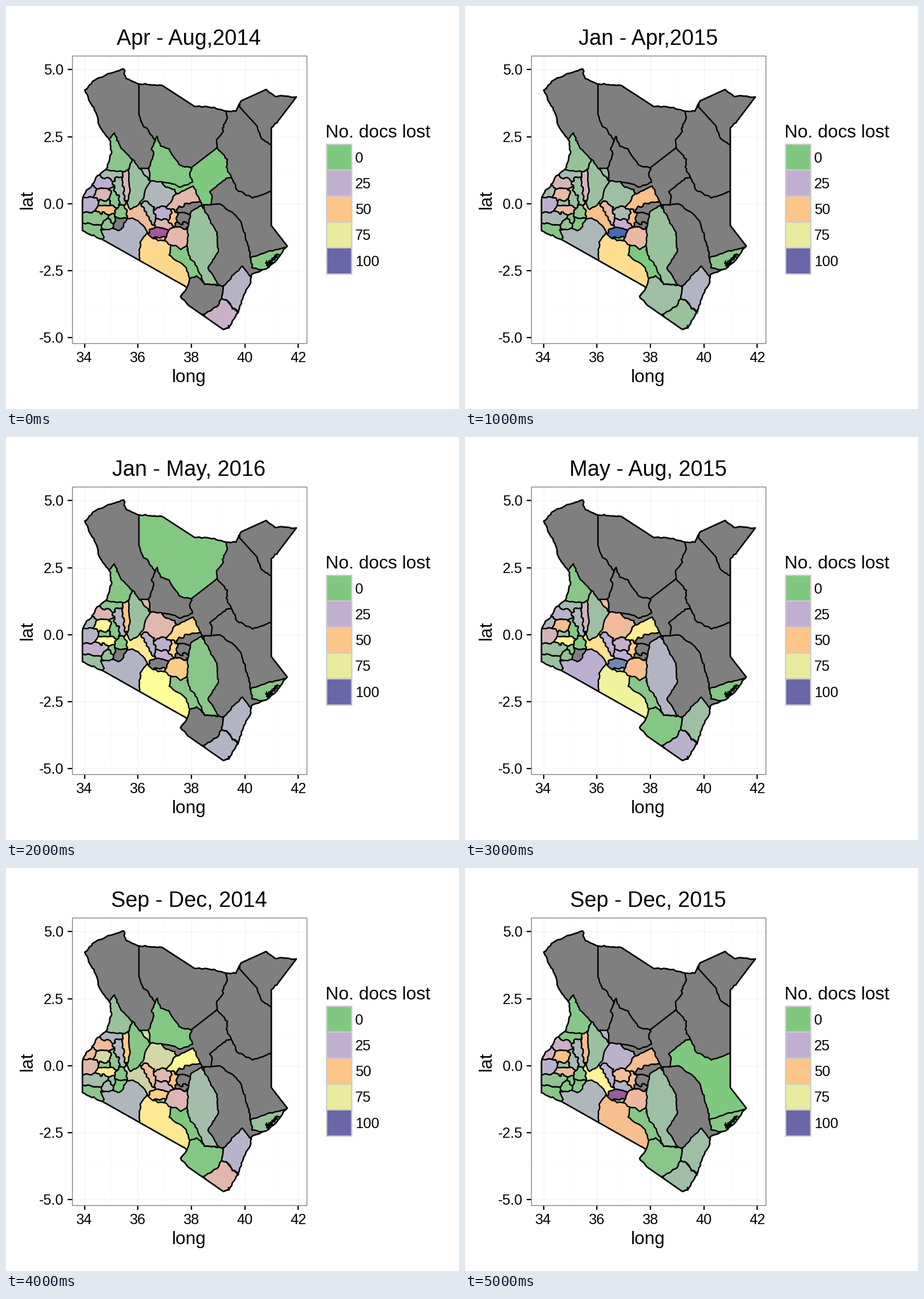
Recreate the animation shown at these times as a matplotlib script. Size 794 by 705 pixels, loop 6 s.

```python
import numpy as np
import matplotlib.pyplot as plt
from matplotlib.animation import FuncAnimation
from matplotlib.patches import PathPatch, Polygon, Rectangle

W, H, DPI = 794, 705, 100
PT = 72 / DPI
LINE = 2.5 * PT
plt.rcParams["font.family"] = "Liberation Sans"

TITLES = ["Apr - Aug,2014", "Jan - Apr,2015", "Jan - May, 2016",
          "May - Aug, 2015", "Sep - Dec, 2014", "Sep - Dec, 2015"]
STOPS = ["7FC97F", "BEAED4", "FDC086", "FFFF99", "386CB0", "F0027F"]
TOP = 120
N = None
NO_DATA = "#7f7f7f"

XYZ = np.array([[0.4124, 0.3576, 0.1805],
                [0.2126, 0.7152, 0.0722],
                [0.0193, 0.1192, 0.9505]])
WHITE = XYZ.sum(axis=1)


def to_lab(code):
    rgb = np.array([int(code[i:i + 2], 16) for i in (0, 2, 4)]) / 255
    lin = np.where(rgb > 0.04045, ((rgb + 0.055) / 1.055) ** 2.4, rgb / 12.92)
    t = XYZ @ lin / WHITE
    f = np.where(t > 0.008856, np.cbrt(t), 7.787 * t + 16 / 116)
    return np.array([116 * f[1] - 16, 500 * (f[0] - f[1]), 200 * (f[1] - f[2])])


def to_rgb(lab):
    fy = (lab[0] + 16) / 116
    f = np.array([fy + lab[1] / 500, fy, fy - lab[2] / 200])
    t = np.where(f > 0.2069, f ** 3, (f - 16 / 116) / 7.787)
    lin = np.clip(np.linalg.solve(XYZ, t * WHITE), 0, 1)
    return np.where(lin > 0.0031308, 1.055 * lin ** (1 / 2.4) - 0.055, 12.92 * lin)


LABS = np.array([to_lab(s) for s in STOPS])


def shade(value):
    if value is None:
        return NO_DATA
    at = np.linspace(0, TOP, len(LABS))
    lab = np.array([np.interp(value, at, LABS[:, k]) for k in range(3)])
    return tuple(np.clip(to_rgb(lab), 0, 1))


fig = plt.figure(figsize=(W / DPI, H / DPI), dpi=DPI, facecolor="white")
ax = fig.add_axes([0, 0, 1, 1])
ax.set_xlim(0, W)
ax.set_ylim(H, 0)
ax.axis("off")


def text(x, y, s, px, **kw):
    return ax.text(x, y, s, fontsize=px * PT, color="black", va="baseline", **kw)


def rule(xs, ys, color, px=1.0):
    ax.plot(xs, ys, color=color, lw=px * PT, zorder=1, solid_capstyle="butt")


# Panel, grid and axes
L, R, T, B = 115.5, 527, 86.5, 589.5
DEG = 46.85


def px_x(lon):
    return 137.6 + (lon - 34) * DEG


def px_y(lat):
    return 345.7 - lat * DEG


for k in range(4):
    rule([px_x(35 + 2 * k)] * 2, [T, B], "#f8f8f8")
    rule([L, R], [px_y(3.75 - 2.5 * k)] * 2, "#f8f8f8")
for k in range(5):
    x, y = px_x(34 + 2 * k), px_y(5 - 2.5 * k)
    rule([x, x], [T, B], "#f0f0f0")
    rule([L, R], [y, y], "#f0f0f0")
    rule([x, x], [B, B + 8], "black", 2.2)
    rule([L - 8, L], [y, y], "black", 2.2)
    text(x, 623, str(34 + 2 * k), 25.2, ha="center")
    text(101, y + 9, f"{5 - 2.5 * k:.1f}", 25.2, ha="right")
ax.add_patch(Rectangle((L, T), R - L, B - T, fill=False, ec="#7f7f7f",
                       lw=1.4 * PT, zorder=9))
text(321, 658, "long", 31.6, ha="center")
text(45.5, 338, "lat", 31.6, ha="center", rotation=90, rotation_mode="anchor")
title = text(320.7, 68, "", 37.9, ha="center")

# Legend
text(559.5, 230, "No. docs lost", 31.8)
for i in range(5):
    y = 242 + 45.3 * i
    ax.add_patch(Rectangle((561.5, y), 44.6, 45.3, fc=shade(25 * i), ec="#cccccc",
                           lw=2.3 * PT, joinstyle="miter"))
    text(612, y + 31.5, str(25 * i), 25.2)


# Shapes
def edge(a, b, amp):
    """Points from a up to b; short edges wobble, the same way in both directions."""
    if a > b:
        return edge(b, a, amp)[::-1]
    p, q = np.array(a, float), np.array(b, float)
    size = np.hypot(*(q - p))
    n = int(size // 4) if size < 45 else 1
    pts = np.linspace(p, q, max(n, 1) + 1)
    rng = np.random.default_rng(a + b)
    pts[1:-1] += rng.normal(0, amp, (len(pts) - 2, 2))
    return pts


def border(pts, amp=0.7):
    return np.vstack([edge(a, b, amp)[:-1] for a, b in zip(pts, pts[1:] + pts[:1])])


outline = border([
    (138, 147), (155, 130), (182, 118), (206, 110), (211, 127), (231, 136),
    (274, 139), (331, 176), (352, 176), (386, 184), (403, 184), (412, 166),
    (456, 146), (471, 158), (509, 159), (477, 201), (465, 213), (465, 384),
    (493, 420), (474, 445), (456, 460), (430, 470), (428, 486), (417, 505),
    (408, 532), (391, 562), (381, 566), (319, 523), (306, 508), (317, 493),
    (310, 488), (232, 444), (170, 409), (134, 393), (134, 340), (141, 322),
    (150, 316), (160, 297), (175, 286), (185, 258), (181, 234), (163, 208),
    (159, 190), (149, 171)])
land = Polygon(outline, fc=NO_DATA, ec="none", zorder=2)
ax.add_patch(land)
ax.add_patch(Polygon(outline, fill=False, ec="black", lw=2.7 * PT, zorder=5,
                     joinstyle="round"))

counties = []


def add(shape, values):
    shape.set(edgecolor="black", linewidth=LINE, joinstyle="round", zorder=3)
    ax.add_patch(shape)
    shape.set_clip_path(land)
    counties.append((shape, [shade(v) for v in values]))


def area(values, *pts):
    """Later areas cover the hidden part of earlier ones."""
    add(Polygon(border(list(pts))), values)


EMPTY = [N] * 6

# Small counties: each takes the ground nearest to its ellipse.
# centre x, y, half width, half height, tilt in degrees, values
CELLS = [
    (185, 296, 16, 8, 0), (199, 322, 8, 25, -8), (212, 310, 6, 27, 0),
    (146, 325, 10, 9, 0), (171, 310, 17, 10, 0), (170, 331, 13, 10, 0),
    (173, 344, 11, 4, 0), (147, 348, 13, 14, 0), (190, 338, 9, 16, 0),
    (176, 355, 20, 7, 5), (203, 361, 11, 11, 0), (153, 373, 22, 11, 0),
    (152, 392, 20, 11, 20), (177, 382, 10, 9, 0), (186, 374, 5, 9, 0),
    (200, 380, 11, 11, 0), (234, 368, 31, 15, 32)]
CENTRE = [
    (270, 330, 27, 22, 0), (252, 363, 8, 23, -17), (276, 364, 14, 12, 0),
    (293, 369, 7, 14, 0), (277, 383, 17, 8, 20), (270, 396, 15, 9, 10),
    (271, 407, 9, 4, 0), (300, 403, 19, 17, 0), (311, 338, 30, 13, -33),
    (321, 354, 20, 8, 0), (311, 371, 12, 9, 0), (310, 384, 13, 5, 0)]
LOST = [
    [13, 14, 4, 13, 19, 2], [13, 9, 20, 17, 18, 17], [32, 32, 50, 30, 52, 46],
    [22, 13, 14, 18, 42, 30], [24, 32, 34, 21, 42, 28], [34, 40, 68, 46, 78, 48],
    [6, 10, 3, 10, 6, 9], [23, 24, 20, 32, 37, 22], [3, 10, 2, 1, 6, 14],
    [46, 40, 72, 66, 63, 41], [3, 4, 2, 1, 2, 3], [4, 15, 26, 10, 13, 6],
    [2, 2, 9, 9, 4, 2], [6, 8, 7, 4, 14, 2], [2, 1, 4, 3, 9, 2],
    [N, 1, N, N, 1, 1], [42, 47, 64, 60, 79, 68]]
LOST_CENTRE = [
    [17, 10, 36, 42, 78, 22], [14, 38, 20, 24, 41, 22], [23, 14, 22, 26, 36, 44],
    [48, 46, 55, 52, 49, 43], [34, 26, 26, 23, 30, 19], [107, 97, N, 91, 52, 105],
    [36, 4, 17, 13, 3, 9], [38, 39, 52, 46, 34, 41], [37, 47, 58, 66, 71, 44],
    EMPTY, EMPTY, EMPTY]


def ripple(x, y, rng):
    """Smooth random shift that makes the borders wind."""
    total = 0
    for wave in (8, 11, 15, 21):
        a, phase = rng.uniform(0, 2 * np.pi, 2)
        total = total + np.sin((x * np.cos(a) + y * np.sin(a)) * 2 * np.pi / wave + phase)
    return total * 0.9


def reach(x, y, cx, cy, rx, ry, tilt):
    c, s = np.cos(np.radians(tilt)), np.sin(np.radians(tilt))
    u, v = x - cx, y - cy
    return np.hypot((u * c + v * s) / rx, (v * c - u * s) / ry)


gx, gy = np.meshgrid(np.arange(126, 348), np.arange(284, 430))
rng = np.random.default_rng(3)
wx, wy = gx + ripple(gx, gy, rng), gy + ripple(gx, gy, rng)
dist = np.array([reach(wx, wy, *cell) for cell in CELLS + CENTRE])
for k, values in enumerate(LOST + LOST_CENTRE):
    gap = np.delete(dist, k, axis=0).min(axis=0) - dist[k]
    filled = ax.contourf(gx, gy, gap, levels=[0, 1e6])
    path = filled.get_paths()[0]
    filled.remove()
    add(PathPatch(path), values)

# North and east
area([N, N, 1, N, N, N],
     (233, 125), (300, 125), (386, 178), (388, 196), (379, 214), (381, 219),
     (369, 234), (370, 248), (326, 285), (280, 275), (262, 238), (249, 216),
     (241, 211), (233, 190))
area(EMPTY,
     (409, 160), (409, 176), (440, 210), (448, 232), (465, 243), (530, 160),
     (456, 130))
area([0, N, N, N, N, N],
     (370, 248), (388, 268), (386, 282), (395, 300), (370, 335), (359, 348),
     (344, 348), (328, 315), (300, 329), (296, 321), (280, 317), (273, 309),
     (322, 305), (322, 285))
area([N, N, N, N, N, 0],
     (395, 300), (405, 322), (432, 336), (465, 325), (490, 325), (510, 420),
     (491, 422), (430, 445), (423, 414), (412, 378), (400, 364), (374, 346),
     (359, 348), (361, 331), (357, 325), (380, 306))
area([1, N, N, N, 1, N],
     (265, 228), (271, 245), (286, 250), (303, 277), (326, 285), (322, 293),
     (327, 308), (304, 317), (296, 312), (274, 308), (253, 307), (250, 283),
     (259, 259), (255, 251))
area([2, 3, 2, 1, 8, 2],
     (429, 440), (450, 433), (476, 426), (505, 420), (475, 465), (452, 461),
     (431, 458))

# West
area([9, 9, 9, 10, 2, 9],
     (221, 268), (233, 284), (253, 307), (244, 322), (241, 337), (232, 348),
     (218, 356), (212, 345), (217, 326), (215, 305), (216, 284))
area([3, 6, 2, 2, 8, 2],
     (182, 232), (190, 222), (200, 245), (221, 268), (216, 284), (208, 290),
     (192, 289), (175, 286), (160, 270))
area([19, 16, 19, 23, 17, 17],
     (166, 391), (188, 389), (197, 393), (206, 386), (212, 373), (222, 371),
     (232, 376), (243, 387), (250, 400), (240, 470), (160, 425), (172, 405))

# South
area([57, 59, 72, 74, 63, 45],
     (247, 397), (258, 407), (280, 411), (295, 425), (330, 470), (320, 510),
     (232, 470), (234, 430), (235, 413))
area([8, 8, 3, 19, 12, 10],
     (343, 349), (356, 372), (370, 396), (372, 430), (354, 459), (374, 488),
     (348, 487), (322, 450), (317, 419), (319, 403), (318, 390), (321, 374),
     (324, 360))
area([2, 0, 3, 3, 0, 2],
     (289, 419), (298, 419), (306, 426), (317, 419), (323, 443), (331, 449),
     (348, 487), (334, 473), (322, 477), (316, 458), (286, 436))
area([N, 10, N, 1, 1, 3],
     (322, 477), (334, 472), (348, 487), (382, 489), (378, 512), (372, 524),
     (346, 540), (290, 530), (317, 493))
area([20, 19, 19, 10, 21, 10],
     (414, 455), (428, 473), (445, 480), (415, 540), (404, 536), (386, 514),
     (378, 512), (382, 489), (399, 470))
area([28, 8, 19, 22, 36, 11],
     (378, 512), (386, 514), (397, 530), (412, 536), (385, 585), (346, 540),
     (372, 524))


def islets(a, b, n, spread, seed):
    rng = np.random.default_rng(seed)
    pts = np.linspace(a, b, n) + rng.normal(0, spread, (n, 2))
    ax.plot(*pts.T, color="black", lw=2 * PT, zorder=6, solid_joinstyle="round")


islets((477, 434), (458, 453), 46, 2.4, 4)
islets((391, 561), (383, 566), 9, 1.2, 2)
islets((401, 531), (407, 536), 8, 1.1, 5)


def draw(i):
    title.set_text(TITLES[i])
    for shape, colors in counties:
        shape.set_facecolor(colors[i])
    return []


anim = FuncAnimation(fig, draw, frames=len(TITLES), interval=1000,
                     init_func=lambda: draw(0), repeat=True, repeat_delay=0)
plt.show()
```
